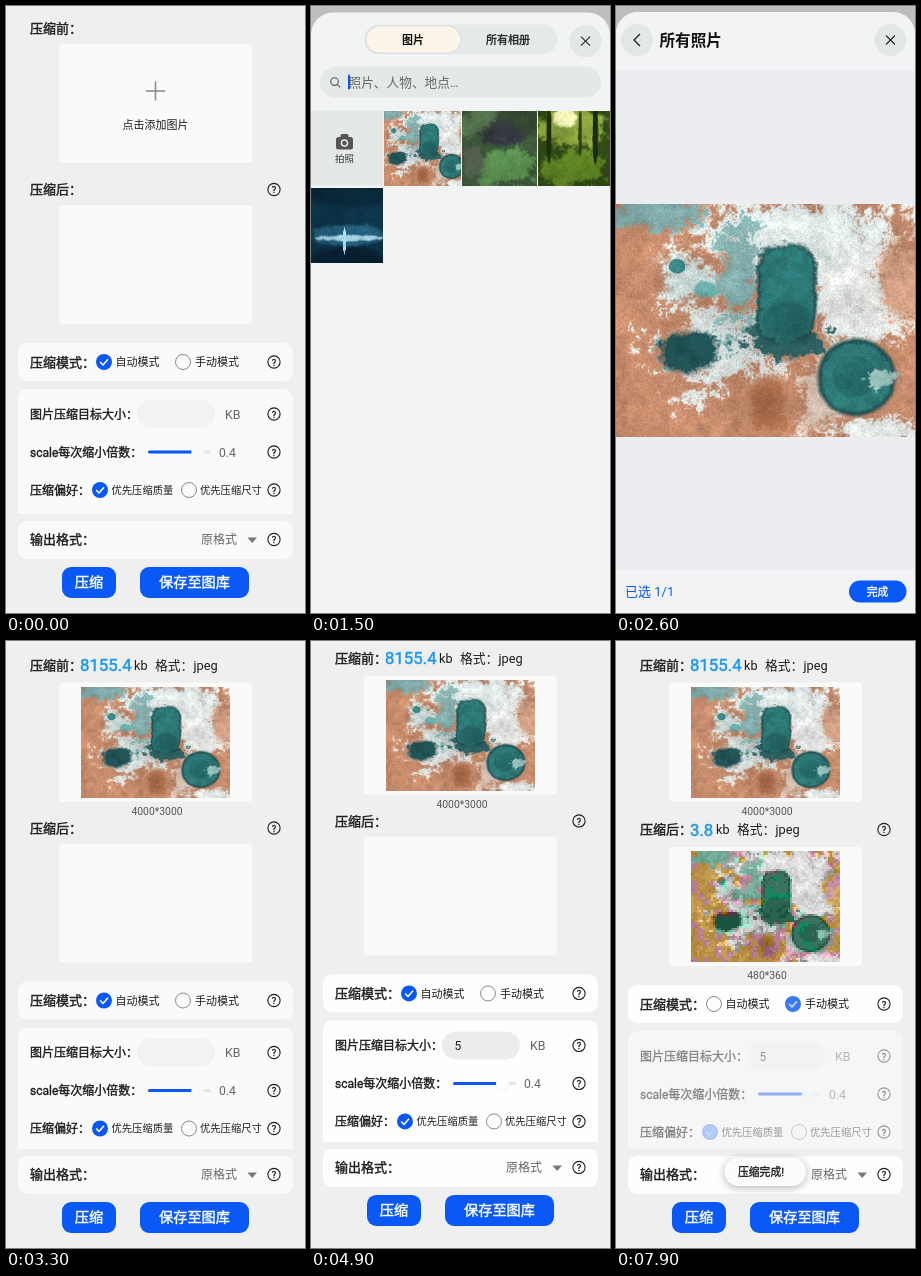
An HTML page with a canvas that plays this animation: 299 px wide and 607 px high, repeating every 8000 ms.

```html
<!DOCTYPE html>
<html lang="zh">
<head>
<meta charset="utf-8">
<title>图片压缩</title>
<style>
html, body { margin: 0; width: 100%; height: 100%; overflow: hidden; background: #efefef; }
canvas { display: block; width: 299px; height: 607px; }
</style>
</head>
<body>
<canvas id="stage"></canvas>
<script>
const W = 299, H = 607, LOOP = 8000, STEP = 100;
const FONT = 'Roboto, "Noto Sans CJK SC", "Noto Sans CJK", "Noto Sans", sans-serif';
const BLUE = '#0a59f7', INK = '#1c1c1c', GREY = '#666';
const stage = document.getElementById('stage');
const ctx = stage.getContext('2d');
const dpr = window.devicePixelRatio || 1;
stage.width = W * dpr;
stage.height = H * dpr;

const clamp = v => Math.max(0, Math.min(1, v));
const lerp = (a, b, p) => a + (b - a) * p;
const span = (t, from, length) => clamp((t - from) / length);
const easeOut = p => 1 - (1 - p) ** 3;

// ---------- procedural pictures ----------
function hash(x, y) {
  const s = Math.sin(x * 127.1 + y * 311.7) * 43758.5453;
  return s - Math.floor(s);
}

function smoothNoise(x, y) {
  const i = Math.floor(x), j = Math.floor(y);
  const u = (x - i) ** 2 * (3 - 2 * (x - i)), v = (y - j) ** 2 * (3 - 2 * (y - j));
  return lerp(lerp(hash(i, j), hash(i + 1, j), u), lerp(hash(i, j + 1), hash(i + 1, j + 1), u), v);
}

const rgb = hex => [1, 3, 5].map(i => parseInt(hex.slice(i, i + 2), 16));

function newCanvas(w, h) {
  const c = document.createElement('canvas');
  c.width = w;
  c.height = h;
  return c;
}

// Each blob: centre x, y, radius x, y, edge roughness, colour, squareness
function paint(w, h, base, blobs) {
  const c = newCanvas(w, h), g = c.getContext('2d'), img = g.createImageData(w, h);
  const ground = rgb(base);
  const list = blobs.map(([x, y, rx, ry, rough, tint, pow = 2]) => [x, y, rx, ry, rough, rgb(tint), pow]);
  for (let y = 0; y < h; y++) for (let x = 0; x < w; x++) {
    const n = 0.4 * smoothNoise(x / 20, y / 20) + 0.35 * smoothNoise(x / 7, y / 7) + 0.25 * smoothNoise(x / 2, y / 2) - 0.5;
    let col = ground;
    for (const [bx, by, rx, ry, rough, tint, pow] of list) {
      const d = (Math.abs((x - bx) / rx) ** pow + Math.abs((y - by) / ry) ** pow) ** (1 / pow);
      const a = clamp((1 - d + n * rough) * (rough < 0.5 ? 9 : 3.5));
      if (a > 0) col = col.map((v, i) => lerp(v, tint[i], a));
    }
    const shade = 1 + n * 0.4 + (hash(x + 9, y + 5) - 0.5) * 0.12;
    const k = (y * w + x) * 4;
    for (let i = 0; i < 3; i++) img.data[k + i] = col[i] * shade;
    img.data[k + 3] = 255;
  }
  g.putImageData(img, 0, 0);
  return c;
}

const aerial = paint(W, 233, '#c98e6e', [
  [190, 40, 112, 66, 1.6, '#dde6e5'],
  [112, 135, 66, 60, 2.4, '#cfd6d3'],
  [30, 8, 55, 20, 1.6, '#7ba3a2'],
  [236, 100, 56, 56, 1.6, '#dde0dd'],
  [72, 75, 36, 30, 1.2, '#cfdedc'],
  [284, 72, 24, 40, 1.4, '#cd9b80'],
  [205, 190, 28, 50, 1.8, '#d3bdae'],
  [122, 80, 24, 56, 2.2, '#7fa9a7'],
  [170, 136, 44, 20, 1.8, '#2d5d5e'],
  [150, 200, 26, 30, 1.4, '#ac6e4d'],
  [262, 226, 60, 16, 1.8, '#dfe4e1'],
  [70, 147, 31, 24, 0.9, '#1f4f52'],
  [170, 89, 32, 51, 0.3, '#1d4a4b', 4],
  [170, 88, 29, 47, 0.3, '#2c7876', 4],
  [172, 116, 27, 22, 0.8, '#225f5f'],
  [240, 173, 42, 41, 0.15, '#1c4c4f'],
  [240, 173, 38, 37, 0.15, '#2f7a78'],
  [238, 172, 23, 22, 0.3, '#276c6b'],
  [266, 173, 20, 11, 1.6, '#94bcb7'],
  [61, 62, 9, 8, 0.4, '#3c8a8b'],
  [88, 86, 15, 11, 0.9, '#6bb0ae']
]);

const stream = paint(76, 75, '#3f5a3c', [
  [14, 12, 26, 18, 1.6, '#54754d'],
  [58, 10, 24, 16, 1.6, '#33432f'],
  [34, 24, 26, 13, 1.6, '#33373e'],
  [44, 58, 44, 20, 1.6, '#578a4d'],
  [10, 50, 14, 24, 1.6, '#53604f']
]);

const forest = paint(76, 75, '#324b16', [
  [30, 16, 40, 24, 1.2, '#869f3c'],
  [27, 7, 13, 11, 0.6, '#f1efb4'],
  [36, 60, 46, 18, 1.6, '#5a7f22'],
  [60, 22, 3, 32, 0.4, '#1c2a0c'],
  [11, 24, 3, 30, 0.4, '#1f2e0c'],
  [44, 22, 2, 24, 0.4, '#2c3f12']
]);

const network = paint(72, 75, '#0d3348', [
  [36, 4, 60, 16, 0.8, '#0a2738'],
  [36, 74, 52, 18, 0.8, '#08202f'],
  [36, 47, 46, 12, 0.6, '#225a77'],
  [36, 50, 38, 3, 1.2, '#9cc4d6'],
  [33, 53, 1.5, 14, 0.2, '#9fd0e6']
]);

// Heavy block compression: coarse brightness, coarser colour
function crush(src) {
  const w = 75, h = 56, c = newCanvas(w, h), g = c.getContext('2d');
  g.drawImage(src, 0, 0, w, h);
  const img = g.getImageData(0, 0, w, h), d = img.data, from = d.slice();
  const round = (v, q) => Math.round(v / q) * q;
  for (let y = 0; y < h; y++) for (let x = 0; x < w; x++) {
    const k = (y * w + x) * 4;
    const bx = x - x % 3, by = y - y % 3, m = (by * w + bx) * 4;
    const luma = i => 0.3 * from[i] + 0.59 * from[i + 1] + 0.11 * from[i + 2];
    const jitter = (hash(bx, by) - 0.5) * 12;
    const cr = round((from[m] - luma(m)) * 0.71 + jitter, 26);
    const cb = round((from[m + 2] - luma(m)) * 0.56 + jitter, 44);
    const l = round(luma(k) * 0.96, 16);
    d[k] = l + 1.4 * cr;
    d[k + 1] = l - 0.34 * cb - 0.71 * cr;
    d[k + 2] = l + 1.77 * cb;
  }
  g.putImageData(img, 0, 0);
  return c;
}
const crushed = crush(aerial);

// ---------- drawing helpers ----------
// Weight 500 is the regular cut with a hairline outline
function text(s, x, y, size, color = INK, weight = 400, align = 'left') {
  const base = y + size * 0.375, medium = weight === 500;
  ctx.font = `${medium ? 400 : weight} ${size}px ${FONT}`;
  ctx.textAlign = align;
  ctx.fillStyle = color;
  ctx.fillText(s, x, base);
  if (medium) {
    ctx.strokeStyle = color;
    ctx.lineWidth = size * 0.03;
    ctx.lineJoin = 'round';
    ctx.strokeText(s, x, base);
  }
}

function box(x, y, w, h, r, color) {
  ctx.beginPath();
  ctx.roundRect(x, y, w, h, r);
  ctx.fillStyle = color;
  ctx.fill();
}

function disc(x, y, r, color) {
  ctx.beginPath();
  ctx.arc(x, y, r, 0, 7);
  ctx.fillStyle = color;
  ctx.fill();
}

function ring(x, y, r, color, width) {
  ctx.beginPath();
  ctx.arc(x, y, r, 0, 7);
  ctx.strokeStyle = color;
  ctx.lineWidth = width;
  ctx.stroke();
}

function line(color, width, ...p) {
  ctx.beginPath();
  for (let i = 0; i < p.length; i += 2) ctx.lineTo(p[i], p[i + 1]);
  ctx.strokeStyle = color;
  ctx.lineWidth = width;
  ctx.stroke();
}

function help(y) {
  ring(268, y, 6.1, INK, 1.1);
  text('?', 268, y, 9.5, INK, 500, 'center');
}

function radio(x, y, on) {
  const alpha = ctx.globalAlpha;
  ctx.globalAlpha = alpha * (1 - on);
  ring(x, y, 7.5, '#8a8a8a', 1);
  ctx.globalAlpha = alpha * on;
  disc(x, y, 8, BLUE);
  line('#fff', 1.5, x - 3.8, y, x - 1, y + 3, x + 4, y - 2.8);
  ctx.globalAlpha = alpha;
}

function button(x, w, label, color) {
  box(x, 561, w, 31, 9, color);
  text(label, x + w / 2, 576, 14.2, '#fff', 500, 'center');
}

function fileInfo(size, x, y) {
  text(size, 74, y, 16.8, '#1b98f5', 500);
  text('kb', x, y, 12.6, INK);
  text('格式：jpeg', x + 21, y, 12.8, INK);
}

// ---------- main page ----------
function drawPage(t) {
  const picked = t >= 3000, done = t >= 6500, edited = t >= 3700;
  const a = picked ? 3.5 : 0, b = a + (done ? 3.5 : 0);
  const card = edited ? '#fefefe' : '#fafafa';

  text('压缩前：', 24, picked ? 24 : 22, 13, INK, 500);
  box(53, 38 + a, 193, 119, 4, '#fafafa');
  if (picked) {
    fileInfo('8155.4', 128, 24);
    text('4000*3000', 151, 170, 10.4, '#555', 400, 'center');
    if (t >= 3300) ctx.drawImage(aerial, 75, 46, 149, 111);
  } else {
    line('#8c8c8c', 1.6, 140, 85, 159, 85);
    line('#8c8c8c', 1.6, 149.5, 75.5, 149.5, 94.5);
    text('点击添加图片', 149.5, 119, 11, INK, 400, 'center');
  }

  const after = done ? 188.5 : 183.5 + a;
  text('压缩后：', 24, after, 13, INK, 500);
  help(after);
  box(53, 199 + b, 193, 119, 4, '#fafafa');
  if (done) {
    fileInfo('3.8', 100, 188.5);
    ctx.imageSmoothingEnabled = false;
    ctx.drawImage(crushed, 75, 210, 149, 111);
    ctx.imageSmoothingEnabled = true;
    text('480*360', 151, 334, 10.4, '#555', 400, 'center');
  }

  const manual = span(t, 7620, 350);
  const mode = 356 + b;
  box(12, 337 + b, 275, 38, 9, card);
  text('压缩模式：', 24, mode, 13, INK, 500);
  radio(98, mode, 1 - easeOut(manual));
  text('自动模式', 109.5, mode, 11);
  radio(177, mode, manual);
  text('手动模式', 189, mode, 11);
  help(mode);

  drawOptions(t, b, card, easeOut(manual));

  box(12, 515, 275, 38, 9, card);
  text('输出格式：', 24, 533.5, 13, INK, 500);
  text('原格式', 195, 533.5, 12, GREY);
  ctx.beginPath();
  ctx.moveTo(241.5, 531.5);
  ctx.lineTo(251, 531.5);
  ctx.lineTo(246.2, 537);
  ctx.fillStyle = '#777';
  ctx.fill();
  help(533.5);

  button(56, 54, '压缩', t >= 5800 && t < 5900 ? '#0950de' : BLUE);
  button(134, 109, '保存至图库', BLUE);
}

function drawOptions(t, shift, card, disabled) {
  ctx.save();
  ctx.beginPath();
  ctx.rect(0, 0, W, 508);
  ctx.clip();
  ctx.translate(0, shift);
  ctx.globalAlpha = 1 - 0.58 * disabled;
  box(12, 383, 275, 132, 9, card);

  text('图片压缩目标大小：', 24, 408, 12, INK, 500);
  box(131, 394, 78, 28, 14, t >= 3700 ? '#ebeded' : '#f2f2f2');
  if (t >= 4500) text('5', 143.5, 408, 12);
  if (t >= 4000 && t < 4800) box(t < 4500 ? 144 : 150.5, 401.5, 1.2, 13, 0, BLUE);
  text('KB', 219, 408, 12.4, GREY);
  help(408);

  text('scale每次缩小倍数：', 24, 446, 12, INK, 500);
  box(142, 444.5, 63, 3, 1.5, '#e6e6e6');
  box(142, 444.5, 46, 3, 1.5, BLUE);
  if (t >= 3700) disc(191.5, 446.5, 6.5, '#ececec');
  disc(191.5, 446, 6.2, card);
  text('0.4', 213, 446, 12.2, GREY);
  help(446);

  text('压缩偏好：', 24, 484, 12, INK, 500);
  radio(94, 484, 1 - 0.35 * disabled);
  text('优先压缩质量', 105.5, 484, 10.3);
  radio(183, 484, 0);
  text('优先压缩尺寸', 194, 484, 10.3);
  help(484);
  ctx.restore();
}

function drawToast(t) {
  if (t < 6500) return;
  ctx.save();
  ctx.globalAlpha = t < 6600 ? 0.6 : 1;
  ctx.shadowColor = 'rgba(0,0,0,.28)';
  ctx.shadowBlur = 9 * dpr;
  ctx.shadowOffsetY = 2 * dpr;
  box(108.5, 516.5, 81.5, 28.5, 14, '#fcfcfc');
  ctx.shadowColor = 'transparent';
  text('压缩完成!', 122, 531, 10.8, INK, 500);
  ctx.restore();
}

// ---------- photo picker ----------
function closeButton(x, y) {
  disc(x, y, 16, '#e4e7e8');
  line('#222', 1.1, x - 4.5, y - 4.5, x + 4.5, y + 4.5);
  line('#222', 1.1, x + 4.5, y - 4.5, x - 4.5, y + 4.5);
}

function drawGallery() {
  box(53, 18, 193, 30, 15, '#e5e9ea');
  box(54.5, 19, 96, 28, 14, '#d5dbe0');
  box(55.5, 20, 94, 26, 13, '#fbf5e9');
  text('图片', 102, 33, 11, '#111', 700, 'center');
  text('所有相册', 197, 33, 11, '#222', 500, 'center');
  closeButton(274.5, 34.5);

  box(9, 60, 281, 31, 15.5, '#e5e8e9');
  ring(23.5, 75, 3.8, '#555', 1.1);
  line('#555', 1.1, 26.3, 77.8, 29.3, 80.8);
  text('照片、人物、地点…', 37.5, 75.5, 12.7, GREY);
  box(37, 68, 2, 15, 1, BLUE);

  box(0, 104, 72, 75, 0, '#e5e8e9');
  box(25, 130.5, 17, 12.5, 2.5, '#555');
  box(29.5, 127.5, 8, 5, 1.5, '#555');
  disc(33.5, 136.5, 3.8, '#e5e8e9');
  disc(33.5, 136.5, 2.3, '#555');
  text('拍照', 33.5, 152, 9.5, '#333', 400, 'center');
  ctx.drawImage(aerial, 31, 0, 237, 233, 73, 104, 76.5, 75);
  ctx.drawImage(stream, 150.5, 104, 75.5, 75);
  ctx.drawImage(forest, 227, 104, 72, 75);
  ctx.drawImage(network, 0, 181, 72, 75);
}

function drawPreview(p) {
  ctx.save();
  ctx.globalAlpha = p;
  box(0, 6, W, H - 6, [22, 22, 0, 0], '#f1f3f5');
  box(0, 65, W, 498, 0, '#ebedf0');
  disc(21, 34, 16, '#e4e7e8');
  line('#222', 1.4, 24, 28, 18, 34, 24, 40);
  text('所有照片', 43.5, 34, 15.6, '#111', 700);
  closeButton(274.5, 34);
  text('已选 1/1', 9, 585.5, 13, BLUE);
  box(233, 574.5, 57.5, 22, 11, BLUE);
  text('完成', 261.5, 585.5, 10.8, '#fff', 500, 'center');
  ctx.globalAlpha = 1;
  ctx.drawImage(aerial, lerp(31, 0, p), 0, lerp(237, W, p), 233,
    lerp(73, 0, p), lerp(104, 198, p), lerp(76.5, W, p), lerp(75, 233, p));
  ctx.restore();
}

function drawSheet(t) {
  if (t < 1100 || t >= 3100) return;
  const shown = easeOut(span(t, 1050, 500)) * (1 - span(t, 2740, 360) ** 1.5);
  ctx.fillStyle = `rgba(0,0,0,${0.21 * shown})`;
  ctx.fillRect(0, 0, W, H);
  ctx.save();
  ctx.translate(0, (H - 6) * (1 - shown));
  box(0, 6, W, H, [22, 22, 0, 0], '#f1f3f5');
  const open = easeOut(span(t, 1950, 250));
  if (open < 1) drawGallery();
  if (open > 0) drawPreview(open);
  ctx.restore();
}

// ---------- number keyboard ----------
function drawKeyboard(t) {
  const up = easeOut(span(t, 3650, 550)) * (1 - span(t, 4730, 150));
  if (up <= 0) return;
  ctx.save();
  ctx.translate(0, 229 * (1 - up));
  box(0, 378, W, 229, 0, '#e3e6ea');
  ['1 2 3 删除', '4 5 6 .', '7 8 9 -', '* 0 # 完成'].forEach((row, j) => {
    row.split(' ').forEach((key, i) => {
      const x = 6 + i * 72.5, y = 404 + j * 45;
      box(x, y, 68, 40, 6, i < 3 ? '#fdfdfd' : '#d3d8de');
      text(key, x + 34, y + 20, key.length > 1 ? 12 : 18, INK, 400, 'center');
    });
  });
  ctx.restore();
}

function draw(t) {
  ctx.setTransform(dpr, 0, 0, dpr, 0, 0);
  ctx.fillStyle = '#efefef';
  ctx.fillRect(0, 0, W, H);
  const lift = 48 * easeOut(span(t, 3650, 550)) * (1 - easeOut(span(t, 4730, 360)));
  ctx.save();
  ctx.translate(0, -lift);
  drawPage(t);
  ctx.restore();
  drawToast(t);
  drawSheet(t);
  drawKeyboard(t);
}

function tick() {
  const t = performance.now() % LOOP;
  draw(Math.floor(t / STEP) * STEP);
  requestAnimationFrame(tick);
}
tick();
</script>
</body>
</html>
```
